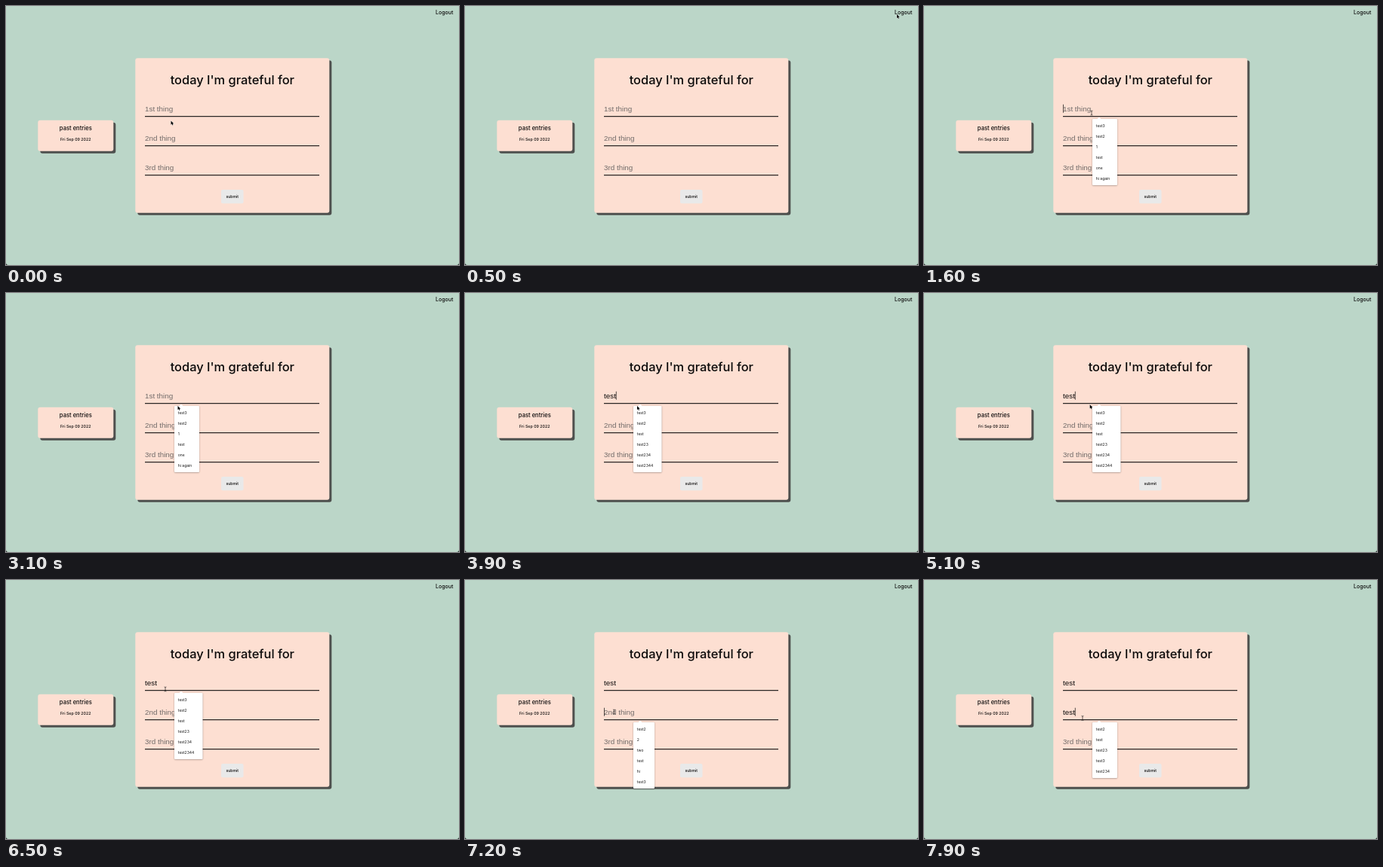
Animation, 600 px wide and 344 px high, one loop 8 s. Source, as an HTML page with a canvas:

```html
<!DOCTYPE html>
<html lang="en">
<head>
<meta charset="utf-8">
<title>Gratitude journal</title>
<style>
  html, body { margin: 0; width: 100%; height: 100%; overflow: hidden; background: #bbd6c8; }
  canvas { display: block; width: 100vw; height: 100vh; }
</style>
</head>
<body>
<canvas id="stage"></canvas>
<script>
const W = 600, H = 344, LOOP = 8000, STEP = 100;
const canvas = document.getElementById('stage');
const ctx = canvas.getContext('2d');
const scale = window.devicePixelRatio || 1;
canvas.width = W * scale;
canvas.height = H * scale;

const UI = 'Inter, "Open Sans", sans-serif';
const FIELD = '"Liberation Sans", Arial, sans-serif';
const PEACH = '#fddfd2', SHADOW = '#4e504e', INK = '#0b0a0a';
const ROW = 14, FIELD_X = 184, FIELD_W = 231, TYPED = 'test';
const FIELD_Y = [136, 175, 214];
const HINTS = ['1st thing', '2nd thing', '3rd thing'];

// Pointer path: time, x, y
const PATH = [
  [0, 218.5, 152.5], [100, 262, 136], [300, 500, 45], [400, 578, 9], [500, 572, 11],
  [700, 330, 105], [800, 224, 141], [1300, 222, 142], [2500, 222, 142],
  [2900, 227.5, 150], [3800, 227.5, 150], [3900, 228, 150], [4400, 228, 150],
  [4500, 230.5, 154], [4800, 231, 159], [5000, 224, 150], [5300, 211, 145],
  [6800, 211, 145], [7100, 197.5, 175], [7300, 197.5, 175], [7700, 210, 183.5]
];

// Menus: start, end, y, width, items
const MENUS = [
  [900, 3300, 150, 33, ['test3', 'test2', '1', 'test', 'one', 'hi again']],
  [3300, 7100, 150, 37.5, ['test3', 'test2', 'test', 'test23', 'test234', 'test2344']],
  [7100, 7400, 189, 28, ['test2', '2', 'two', 'test', 'hi', 'test3']],
  [7400, 8000, 189, 33, ['test2', 'test', 'test23', 'test3', 'test234']]
];

const CARET_ON = [[900, 1800], [2300, 2800], [3300, 4100], [5000, 5500], [6100, 6500], [7100, 8000]];
const CURSOR_OFF = [[3300, 3800], [7400, 7900]];
const PREVIEW = [[4500, 5000]];

const within = (t, spans) => spans.some(([a, b]) => t >= a && t < b);
const typed = (t, start) => TYPED.slice(0, Math.max(0, Math.floor((t - start) / STEP) + 1));

function box(x, y, w, h, r, fill) {
  ctx.fillStyle = fill;
  ctx.beginPath();
  ctx.roundRect(x, y, w, h, r);
  ctx.fill();
}

function text(str, x, y, font, color = INK, align = 'left') {
  ctx.font = font;
  ctx.fillStyle = color;
  ctx.textAlign = align;
  ctx.fillText(str, x, y);
}

function card(x, y, w, h) {
  box(x + 3, y + 3, w, h, 3, SHADOW);
  box(x, y, w, h, 3, PEACH);
}

function drawPage() {
  ctx.fillStyle = '#bbd6c8';
  ctx.fillRect(0, 0, W, H);
  ctx.fillStyle = '#1c211f';
  for (const [x, dir] of [[0, 1], [W, -1]]) {
    ctx.beginPath();
    ctx.moveTo(x, H - 3);
    ctx.quadraticCurveTo(x, H, x + 3 * dir, H);
    ctx.lineTo(x, H);
    ctx.fill();
  }
  text('Logout', 592.3, 10.8, `500 7px ${UI}`, INK, 'right');

  card(42.3, 151.7, 100, 41);
  text('past entries', 92.3, 165.2, `500 7.6px ${UI}`, INK, 'center');
  text('Fri Sep 09 2022', 92.3, 178.5, `500 5.3px ${UI}`, INK, 'center');

  card(171.3, 69.3, 257, 205.5);
  text("today I'm grateful for", 299.8, 104.2, `500 16.4px ${UI}`, INK, 'center');
  box(285, 244, 29.5, 18.3, 2, '#e9e9e9');
  text('submit', 299.8, 255, `500 5.1px ${UI}`, INK, 'center');
}

function drawFields(t) {
  const preview = within(t, PREVIEW);
  const values = [typed(t, 3300), typed(t, 7400), ''];
  const focus = t >= 7100 ? 1 : 0;

  FIELD_Y.forEach((y, i) => {
    const filled = preview && i === 0;
    if (filled) {
      box(FIELD_X, y - 9.5, FIELD_W, 20, 0, '#e1ebfc');
      text('test3', FIELD_X, y + 3.7, `5px ${UI}`);
    } else {
      text(values[i] || HINTS[i], FIELD_X, y + 3.6, `9.85px ${FIELD}`, values[i] ? INK : '#716b69');
    }
    box(FIELD_X, y + 10, FIELD_W, 1.2, 0, '#2b2725');

    if (i === focus && !filled && within(t, CARET_ON)) {
      ctx.font = `9.85px ${FIELD}`;
      const x = FIELD_X + ctx.measureText(values[i]).width;
      box(x, y - 5.3, 0.7, 11, 0, INK);
    }
  });
}

function drawMenu(t) {
  const menu = MENUS.find(([a, b]) => t >= a && t < b);
  if (!menu) return;
  const [, , y, w, items] = menu, x = 223;

  ctx.save();
  ctx.shadowColor = 'rgba(0,0,0,.4)';
  ctx.shadowBlur = 2 * scale;
  ctx.shadowOffsetY = 0.5 * scale;
  box(x, y, w, items.length * ROW + 4, 1, '#fff');
  ctx.restore();

  ctx.beginPath();
  ctx.moveTo(x + 6, y + 0.5);
  ctx.lineTo(x + 9, y - 2.3);
  ctx.lineTo(x + 12, y + 0.5);
  ctx.fillStyle = '#fff';
  ctx.fill();

  if (within(t, PREVIEW)) box(x, y + 2, w, ROW, 0, '#e0e0e0');
  items.forEach((item, i) => text(item, x + 4.8, y + 10.9 + i * ROW, `5px ${UI}`, '#161616'));
}

function pointerAt(t) {
  const n = PATH.findIndex(k => k[0] > t);
  if (n < 0) return PATH[PATH.length - 1].slice(1);
  const [t0, x0, y0] = PATH[n - 1], [t1, x1, y1] = PATH[n];
  const p = (t - t0) / (t1 - t0);
  return [x0 + (x1 - x0) * p, y0 + (y1 - y0) * p];
}

function drawPointer(t) {
  if (within(t, CURSOR_OFF)) return;
  const [x, y] = pointerAt(t);
  const overField = x > FIELD_X && x < FIELD_X + FIELD_W &&
    FIELD_Y.some(fy => y > fy - 10 && y < fy + 11);

  ctx.save();
  ctx.translate(x, y);
  ctx.beginPath();
  if (overField) {
    ctx.moveTo(-1.4, -3);
    ctx.quadraticCurveTo(0, -3, 0, -2);
    ctx.quadraticCurveTo(0, -3, 1.4, -3);
    ctx.moveTo(0, -2);
    ctx.lineTo(0, 2);
    ctx.moveTo(-1.4, 3);
    ctx.quadraticCurveTo(0, 3, 0, 2);
    ctx.quadraticCurveTo(0, 3, 1.4, 3);
    ctx.lineWidth = 0.7;
    ctx.strokeStyle = '#222';
    ctx.stroke();
  } else {
    const shape = [[0, 0], [0, 5.2], [1.2, 4.1], [2, 6], [2.9, 5.6], [2.1, 3.8], [3.7, 3.7]];
    shape.forEach(([px, py]) => ctx.lineTo(px, py));
    ctx.closePath();
    ctx.lineWidth = 0.8;
    ctx.strokeStyle = 'rgba(255,255,255,.8)';
    ctx.stroke();
    ctx.fillStyle = '#000';
    ctx.fill();
  }
  ctx.restore();
}

function render(now) {
  const t = Math.floor((now % LOOP) / STEP) * STEP;
  ctx.setTransform(scale, 0, 0, scale, 0, 0);
  drawPage();
  drawFields(t);
  drawMenu(t);
  drawPointer(t);
}

const start = performance.now();
function tick() {
  render(performance.now() - start);
  requestAnimationFrame(tick);
}
tick();
</script>
</body>
</html>
```
